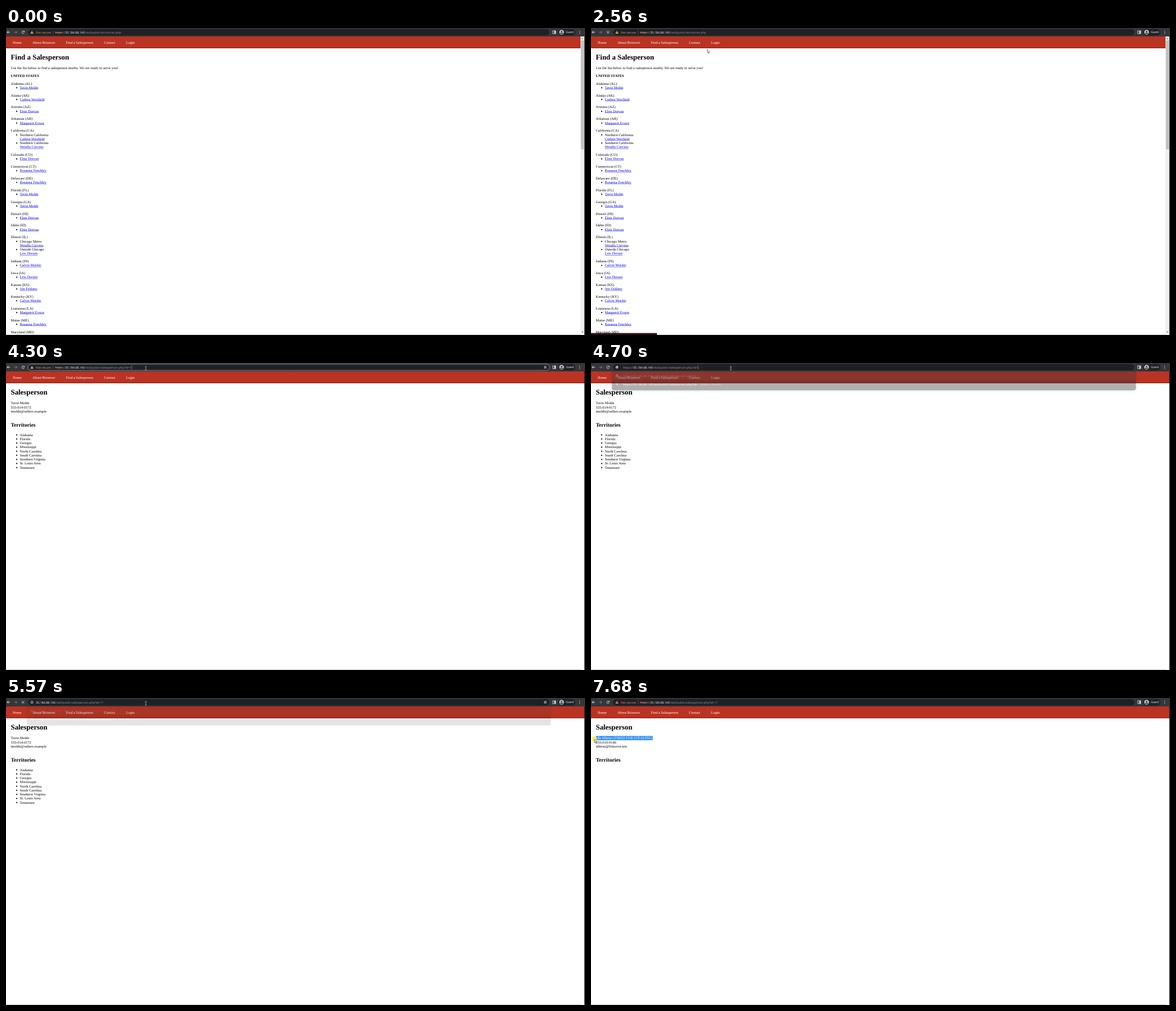
Write an HTML page with a canvas that moves like this. It is 1027 px wide and 545 px high and loops after 8 s.

```html
<!DOCTYPE html>
<html lang="en">
<head>
<meta charset="utf-8">
<title>Find a Salesperson</title>
<style>
  html, body { margin: 0; width: 100%; height: 100%; overflow: hidden; background: #fff; }
  canvas { display: block; }
</style>
</head>
<body>
<canvas id="stage" width="1027" height="545"></canvas>
<script>
const stage = document.getElementById('stage');
const layer = document.createElement('canvas');
layer.width = stage.width;
layer.height = stage.height;
const stageCtx = stage.getContext('2d'), layerCtx = layer.getContext('2d');
let ctx = stageCtx;

const LOOP = 8000, STEP = 70;
const AT = { load: 1900, person: 2700, focus: 3240, edit: 4700, enter: 5570, fired: 5710, drag: 6800 };

const LINE = 7.25, GAP = 6.42, LEFT = 8.5, INDENT = 24.5;
const SERIF = '"Liberation Serif", serif';
const BODY = `6.42px ${SERIF}`, BOLD = `bold 6.42px ${SERIF}`;
const H1 = `bold 12.83px ${SERIF}`, H2 = `bold 9.62px ${SERIF}`;
const UI = '5.3px "Open Sans", sans-serif';
const LIGHT = '#e8eaed', GREY = '#9aa0a6', PILL = '#202124';
const HOST = '35.184.88.145', SALES = '/red/public/salesperson.php?id=';

const DARON = 'Tavin Molde', ROBERT = 'Corben Wexfield', IRENE = 'Elsie Dorvan';
const LIZ = 'Marguerit Evson', SHERRY = 'Wendla Corvino', BARBARA = 'Rosanna Fenchley';
const KEN = 'Lew Dorsen', SAMUEL = 'Calvin Morder', KIM = 'Jon Feldany';
const FIRED = 'Idle Idleton (FIRED FOR STEALING)';

// State followed by its salesperson, or by [region, salesperson] pairs
const states = [
  ['Alabama (AL)', DARON], ['Alaska (AK)', ROBERT], ['Arizona (AZ)', IRENE], ['Arkansas (AR)', LIZ],
  ['California (CA)', ['Northern California', ROBERT], ['Southern California', SHERRY]],
  ['Colorado (CO)', IRENE], ['Connecticut (CT)', BARBARA], ['Delaware (DE)', BARBARA],
  ['Florida (FL)', DARON], ['Georgia (GA)', DARON], ['Hawaii (HI)', IRENE], ['Idaho (ID)', IRENE],
  ['Illinois (IL)', ['Chicago Metro', SHERRY], ['Outside Chicago', KEN]],
  ['Indiana (IN)', SAMUEL], ['Iowa (IA)', KEN], ['Kansas (KS)', KIM], ['Kentucky (KY)', SAMUEL],
  ['Louisiana (LA)', LIZ], ['Maine (ME)', BARBARA], ['Maryland (MD)', DARON]
];
const territories = ['Alabama', 'Florida', 'Georgia', 'Mississippi', 'North Carolina',
  'South Carolina', 'Southern Virginia', 'St. Louis Area', 'Tennessee'];
const nav = ['Home', 'About Brinovet', 'Find a Salesperson', 'Contact', 'Login'];

const within = (t, a, b) => t >= a && t < b;
const smooth = k => k * k * (3 - 2 * k);
const mix = (a, b, k) => a + (b - a) * k;

function text(str, x, y, font = BODY, color = '#000') {
  ctx.font = font;
  ctx.fillStyle = color;
  ctx.fillText(str, x, y);
  return x + ctx.measureText(str).width;
}
function rect(x, y, w, h, color) {
  ctx.fillStyle = color;
  ctx.fillRect(x, y, w, h);
}
function disc(x, y, r, color) {
  ctx.fillStyle = color;
  ctx.beginPath();
  ctx.arc(x, y, r, 0, 7);
  ctx.fill();
}
function round(x, y, w, h, r, color) {
  ctx.fillStyle = color;
  ctx.beginPath();
  ctx.roundRect(x, y, w, h, r);
  ctx.fill();
}
function poly(color, ...points) {
  ctx.fillStyle = color;
  ctx.beginPath();
  points.forEach(([x, y]) => ctx.lineTo(x, y));
  ctx.closePath();
  ctx.fill();
}
function lines(color, width, ...strokes) {
  ctx.strokeStyle = color;
  ctx.lineWidth = width;
  ctx.beginPath();
  for (const s of strokes) s.forEach(([x, y], i) => i ? ctx.lineTo(x, y) : ctx.moveTo(x, y));
  ctx.stroke();
}
function ring(x, y, r, color, from = 0, to = 2 * Math.PI) {
  ctx.strokeStyle = color;
  ctx.lineWidth = 0.8;
  ctx.beginPath();
  ctx.arc(x, y, r, from, to);
  ctx.stroke();
}
function link(str, x, y) {
  const end = text(str, x, y, BODY, '#0000ee');
  rect(x, y + 0.6, end - x, 0.5, '#0000ee');
}
const bullet = y => disc(19, y - 1.8, 1.1, '#000');
const triangle = (x, y, r, color) => poly(color, [x, y - r], [x + r, y + r], [x - r, y + r]);

function drawNav(width) {
  rect(0, 15, width, 20, '#bb3322');
  rect(0, 35, width, 1, '#7d2318');
  let x = 12;
  for (const label of nav) x = text(label, x, 27.9, BODY, '#fff') + 19.25;
}

function drawListPage() {
  drawNav(1019);
  text('Find a Salesperson', LEFT, 55.6, H1);
  text('Use the list below to find a salesperson nearby. We are ready to serve you!', LEFT, 73.3);
  text('UNITED STATES', LEFT, 87, BOLD);
  let y = 100.6;
  for (const [state, ...reps] of states) {
    text(state, LEFT, y);
    for (const rep of reps) {
      y += LINE;
      bullet(y);
      if (Array.isArray(rep)) {
        text(rep[0], INDENT, y);
        y += LINE;
        link(rep[1], INDENT, y);
      } else link(rep, INDENT, y);
    }
    y += LINE + GAP;
  }
  rect(1019, 15, 7, 530, '#f1f1f1');
  rect(1019.7, 22, 5.4, 193.5, '#c1c1c1');
  triangle(1022.3, 18.5, 1.2, '#555');
  triangle(1022.3, 540, -1.2, '#555');
}

function drawPersonPage(details, areas) {
  drawNav(1026);
  text('Salesperson', LEFT, 55.6, H1);
  details.forEach((d, i) => text(d, LEFT, 73.3 + i * LINE));
  text('Territories', LEFT, 113.3, H2);
  areas.forEach((a, i) => {
    const y = 129.5 + i * LINE;
    bullet(y);
    text(a, INDENT, y);
  });
}

// Selects whole characters from the pointer to the end of the line
function drawSelection(x) {
  ctx.font = BODY;
  const edge = i => LEFT + ctx.measureText(FIRED.slice(0, i)).width;
  let n = 0;
  while (n < FIRED.length && (edge(n) + edge(n + 1)) / 2 < x) n++;
  const start = edge(n), width = edge(FIRED.length) - start;
  rect(start, 67.4, width, 7.5, '#3390f5');
  ctx.save();
  ctx.beginPath();
  ctx.rect(start, 66, width, 10);
  ctx.clip();
  text(FIRED, LEFT, 73.3, BODY, '#fff');
  ctx.restore();
}

function globe(y) {
  disc(46, y, 2.4, '#c4c7ca');
  lines('#35363a', 0.6, [[44.2, y - 1], [46.2, y], [45.5, y + 2]]);
}
function arrow(x, dir, color) {
  const tip = x + 2.5 * dir, back = tip - 2.4 * dir;
  lines(color, 0.9, [[x - 2.5 * dir, 7.5], [tip, 7.5]], [[back, 5.1], [tip, 7.5], [back, 9.9]]);
}

const typedId = t => t < AT.edit ? '1' : t < AT.edit + 140 ? '' : t < 5100 ? '1' : '11';

function drawAddress(t) {
  const editing = within(t, AT.edit, AT.enter), loading = within(t, AT.enter, AT.fired);
  let x = 53;
  if (editing) {
    globe(7.5);
    x = text('https://', 57, 9.5, UI, GREY);
  } else if (loading) {
    ring(46, 7.5, 2.2, '#c4c7ca');
    rect(45.7, 6.4, 0.7, 2.6, '#c4c7ca');
  } else {
    const safe = t < AT.fired;
    const tint = safe ? '#e89a68' : '#ee8d7c';
    triangle(46, 7.4, 2.7, safe ? '#f3b95f' : '#ee8272');
    rect(45.7, 6.4, 0.6, 2.6, PILL);
    text('Not secure', 53, 9.5, UI, tint);
    rect(82.8, 4, 0.7, 7, '#5f6368');
    x = text('https', 87, 9.5, UI, tint);
    rect(87, 7.6, x - 87, 0.6, tint);
    x = text('://', x, 9.5, UI, GREY);
  }
  x = text(HOST, x, 9.5, UI, '#f1f3f4');
  x = text(t < AT.person ? '/red/public/territories.php' : SALES + typedId(t), x, 9.5, UI, '#8f9499');
  const blinkOn = Math.floor((t - AT.focus) / 530) % 2 === 0;
  if (editing || within(t, AT.focus, AT.edit) && blinkOn) rect(x + 0.3, 4, 0.6, 7.5, '#a5a9ae');
}

function drawToolbar(t) {
  const focused = within(t, AT.focus, AT.edit), reloading = within(t, AT.enter, AT.fired);
  rect(0, 0, 1027, 15, '#35363a');
  round(39, 2, 925, 11.2, 5.6, PILL);
  if (focused) {
    ctx.strokeStyle = '#8ba3bf';
    ctx.lineWidth = 0.8;
    ctx.stroke();
  }
  arrow(4.5, -1, LIGHT);
  arrow(17, 1, '#7d8084');
  if (reloading || within(t, AT.load, AT.person)) {
    lines(LIGHT, 0.9, [[28, 5.4], [32.4, 9.8]], [[32.4, 5.4], [28, 9.8]]);
  } else {
    ring(30.2, 7.6, 2.2, LIGHT, 0.3, 5.5);
    poly(LIGHT, [32.8, 4.8], [32.8, 7.2], [30.4, 7.2]);
  }
  if (focused || reloading) {
    for (const d of [-1.1, 1.1]) {
      lines('#c4c7ca', 0.7, [[954, 7.5 + d], [959, 7.5 + d]], [[956.5 + d, 5], [956.5 + d, 10]]);
    }
  }
  ctx.strokeStyle = LIGHT;
  ctx.lineWidth = 0.8;
  ctx.strokeRect(969.9, 5, 5, 5);
  rect(972.6, 5, 2.3, 5, LIGHT);
  round(979.5, 2, 30.5, 11.2, 5.6, PILL);
  disc(985.5, 7.5, 4.2, '#c4c7ca');
  disc(985.5, 6.3, 1.4, '#35363a');
  round(982.9, 8.5, 5.2, 1.9, 0.9, '#35363a');
  text('Guest', 993, 9.4, UI, '#f1f3f4');
  for (let i = -1; i < 2; i++) disc(1017.5, 7.5 + i * 2.2, 0.6, LIGHT);
  drawAddress(t);
}

// Painted on its own layer so that the whole panel fades as one
function drawSuggestions(t) {
  if (!within(t, AT.edit, AT.enter + STEP)) return;
  const steps = Math.floor((t - AT.edit) / STEP);
  const alpha = t < AT.enter ? Math.min(1, 0.37 + 0.25 * steps) : 0.12;
  const address = 'https://' + HOST + SALES + typedId(t);
  ctx = layerCtx;
  ctx.clearRect(0, 0, layer.width, layer.height);
  ctx.shadowColor = 'rgba(0,0,0,.3)';
  ctx.shadowBlur = 5;
  ctx.shadowOffsetY = 1;
  round(37, 15, 929.5, 33.5, [0, 0, 4, 4], '#292a2d');
  ctx.shadowColor = 'transparent';
  rect(37, 15, 929.5, 15.3, '#3b3c40');
  globe(22.7);
  text(address, 57, 24.7, UI, '#8ab4f8');
  ring(45.6, 37.5, 1.5, '#c4c7ca');
  lines('#c4c7ca', 0.8, [[46.7, 38.6], [48.4, 40.3]]);
  const end = text(address, 57, 40, UI, '#f1f3f4');
  text(' - Quorvo Search', end, 40, UI, GREY);
  ctx = stageCtx;
  ctx.save();
  ctx.globalAlpha = alpha;
  ctx.beginPath();
  ctx.rect(0, 15, 1027, 60);
  ctx.clip();
  ctx.drawImage(layer, 0, 0);
  ctx.restore();
}

// The pointer's glides, each from wherever the last one ended
const glides = [
  { from: 330, to: 540, x: 605, y: 400 },
  { from: 740, to: 880, x: 124, y: 203 },
  { from: 1210, to: 1210, x: 190, y: 110 },
  { from: 1280, to: 1490, x: 46, y: 104 },
  { from: 2100, to: 2520, x: 206.3, y: 37.7 },
  { from: 2970, to: 3240, x: 239, y: 11 },
  { from: 3900, to: 4040, x: 248, y: 9.5 },
  { from: 6310, to: 6310, x: 139.5, y: 43.2 },
  { from: 6380, to: 6660, x: 121, y: 75 },
  { from: AT.drag, to: 7640, x: 6, y: 73.2 }
];

function pointerAt(t) {
  let x = 1033, y = 554;
  for (const g of glides) {
    if (t < g.from) break;
    const done = (Math.floor((t - g.from) / STEP) + 1) * STEP / (g.to - g.from + STEP);
    const k = smooth(Math.min(1, done));
    x = mix(x, g.x, k);
    y = mix(y, g.y, k);
  }
  return { x, y };
}

function drawPointer(t, { x, y }) {
  if (t < 330 || within(t, 950, 1280)) return;
  const inBar = y < 13, overText = t > AT.drag && x > LEFT && x < 119;
  if (within(t, 1560, 1770) || within(t, 3300, 3570) || t >= AT.drag) {
    disc(x, y, 4.6, inBar ? 'rgba(205,190,20,.85)' : 'rgba(255,235,30,.75)');
  }
  if (inBar || overText) {
    lines(inBar ? '#d5d5d5' : '#222', 0.7, [[x, y - 3], [x, y + 3]],
      ...[-3.2, 3.2].map(d => [[x - 1.3, y + d], [x + 1.3, y + d]]));
    return;
  }
  const outline = [[0, 0], [0, 6.2], [1.4, 5], [2.4, 7.2], [3.3, 6.8], [2.4, 4.7], [4.3, 4.5]]
    .map(([dx, dy]) => [x + dx, y + dy]);
  poly('#fff', ...outline);
  lines('#222', 0.6, [...outline, outline[0]]);
}

function draw(t) {
  rect(0, 0, 1027, 545, '#fff');
  const pointer = pointerAt(t);
  if (t < AT.person) drawListPage();
  else if (t < AT.fired) drawPersonPage([DARON, '555-014-0172', 'tmolde@sellers.example'], territories);
  else drawPersonPage([FIRED, '555-010-0146', 'idleton@brinovet.test'], []);
  if (t >= AT.drag) drawSelection(pointer.x);
  rect(0, 544, 1020, 1, '#c2c2c2');
  rect(1025.8, 15, 1.2, 530, '#17171a');
  if (within(t, 2100, AT.person)) rect(0, 541.5, 117, 3.5, '#2a1318');
  drawToolbar(t);
  drawSuggestions(t);
  drawPointer(t, pointer);
}

for (const c of [stageCtx, layerCtx]) c.textRendering = 'geometricPrecision';
const began = performance.now();
function tick() {
  draw((performance.now() - began) % LOOP);
  requestAnimationFrame(tick);
}
tick();
</script>
</body>
</html>
```
